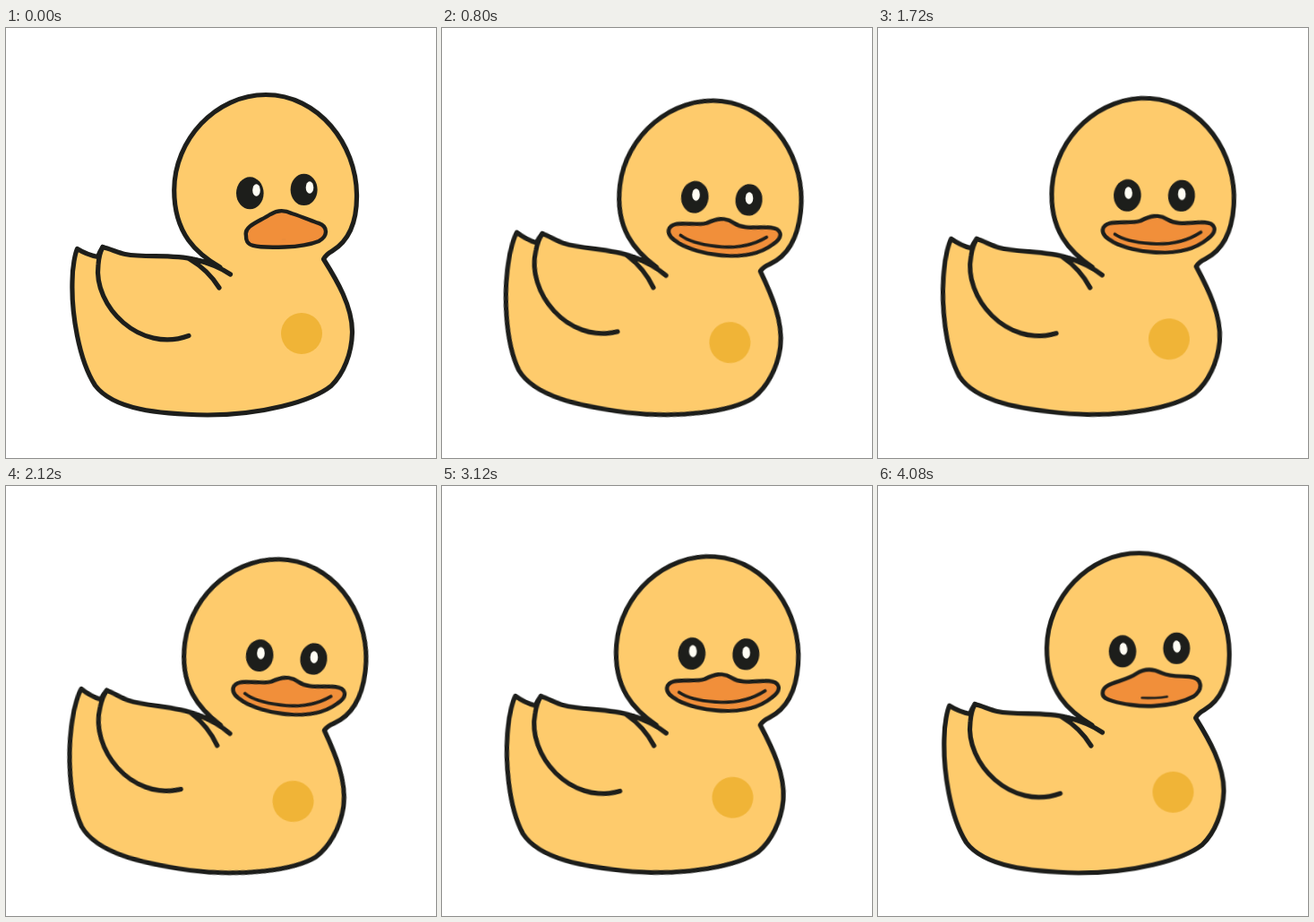
An HTML page that plays this animation: 480x480 px, repeating every 4.12 s.

```html
<!DOCTYPE html>
<html lang="en">
<head>
<meta charset="utf-8">
<title>Rocking duck</title>
<style>
  html, body { margin: 0; width: 100%; height: 100%; overflow: hidden; background: #fff; }
  svg { display: block; width: 100%; height: 100%; }

  .line { fill: none; stroke: #1d1e1b; stroke-width: 5.2; stroke-linecap: round; stroke-linejoin: round; }
  .body { fill: #fecb6c; }
  .eye { fill: #1d1e1b; }
  .glint { fill: #fffdf4; transform-box: fill-box; transform-origin: center; animation: glance 4120ms linear infinite; }
  .badge { fill: #f0b437; }

  .duck { transform-origin: 239px 272px; animation: rock calc(4120ms / 6) linear infinite alternate; }
  .beak { fill: #f18f3a; stroke-width: 4.4; animation: beak 4120ms linear infinite; }
  .smile { stroke-width: 3.6; animation: smile 4120ms linear infinite; }

  @keyframes rock { to { transform: rotate(8deg); } }

  @keyframes glance {
    0% { transform: none; }
    4%, 100% { transform: translate(-6.2px, .5px) rotate(-6deg); }
  }

  /* closed, wide, then narrowing again just before the loop restarts */
  @keyframes beak {
    0% { d: path("M268 231 C266 221 283 216 295 208 C303 203 311 203 319 207 C332 211 340 215 349 218 C360 222 359 233 349 238 C339 242 324 244 311 244.5 C296 245 283 245 276 243 C269 241 268 237 268 231 Z"); }
    4%, 97% { d: path("M247.5 224.5 C248.5 211 276.5 217 289 211.5 C299 205.5 308 202 319 208 C330.5 214 343 209.5 356 208.5 C373.5 206.5 376.5 216.5 365 226.5 C351 240 331 245 309.5 245.5 C290.5 246 271.5 242.5 260.5 237.5 C252.5 233.5 247.5 230.5 247.5 224.5 Z"); }
    99.03%, 100% { d: path("M250.5 231 C250 219 274 219 288 209 C297 203 306 203 316 208 C327 213 339 211 347 212 C362 213 363 226 352 234 C341 240 324 244 308 245 C291 246 272 243 262 240 C255 238 250 236 250.5 231 Z"); }
  }

  @keyframes smile {
    0% { stroke-dasharray: 1 200; stroke-dashoffset: -49; stroke-width: 2.5; opacity: 0; }
    1% { opacity: 1; }
    4%, 97% { stroke-dasharray: 100 200; stroke-dashoffset: 0; stroke-width: 3.6; opacity: 1; }
    99.03%, 100% { stroke-dasharray: 28 200; stroke-dashoffset: -34; stroke-width: 2.6; opacity: 1; }
  }
</style>
</head>
<body>
<svg viewBox="0 0 480 480">
  <g class="duck">
    <path class="line body" d="M354.5 258 C369 281 387 311 386.5 340 C386 363 377 386 363 399.5
      C341 417 285 432 225 432 C170 431 120 426 99.5 399 C81 370 73 318 74 283
      C74 266 77.5 251 79.5 246.5 Q90 253 102.5 255.5 Q104.5 250 108 244.5
      C117 247 126 251 133 252.5 C156 257 184 252 211 258.5 Q227 262 239 267
      C213 252 187.7 230 187.7 181 C187.7 125 234 74.5 290 74.5
      C349 74.5 391 130 391.5 186 C392 222 379 240 364 249 Q357 253 354.5 258 Z"/>
    <path class="line" d="M204 343.5 C150 363.5 97 311 103 264 Q104 252 108 244.5"/>
    <path class="line" d="M211 258.5 Q235 264.5 250.5 275 M205 258 Q225.5 270 238 290"/>
    <circle class="badge" cx="330" cy="341" r="23"/>
    <ellipse class="eye" cx="272.3" cy="184.3" rx="15.3" ry="18"/>
    <ellipse class="eye" cx="332.6" cy="180.4" rx="15" ry="17.7"/>
    <ellipse class="glint" cx="279.5" cy="181" rx="4.3" ry="6.8"/>
    <ellipse class="glint" cx="339" cy="178" rx="4.3" ry="6.8"/>
    <path class="line beak"/>
    <path class="line smile" pathLength="100" d="M261.5 228.5 C274 236 293 236.5 309 236 C330 235 344.5 229 357 219.5"/>
  </g>
</svg>
</body>
</html>
```
